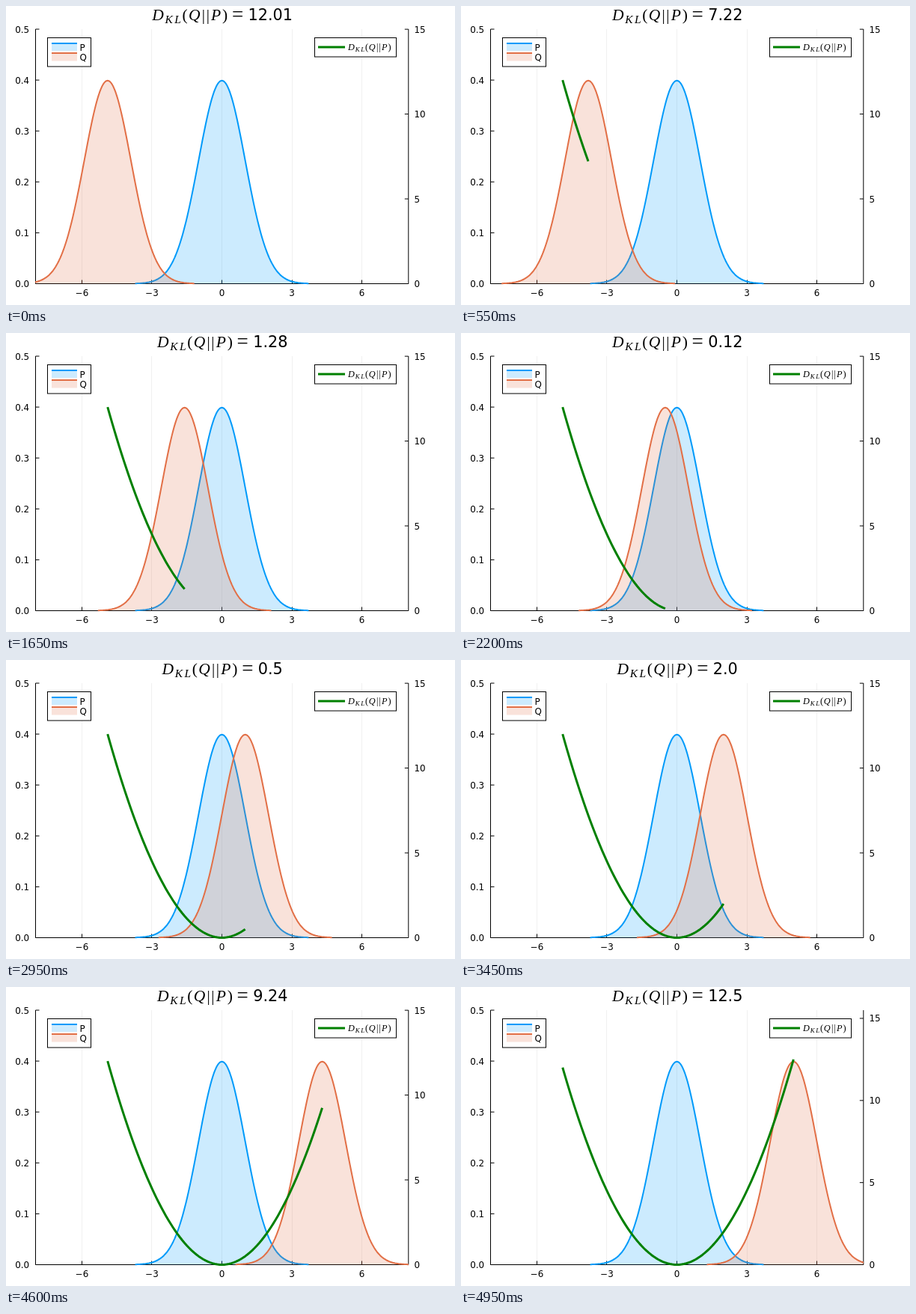
An HTML page for the animation above (5 s loop, 600 by 400 pixels).

```html
<!DOCTYPE html>
<html lang="en">
<head>
<meta charset="utf-8">
<title>KL divergence of two normals</title>
<style>
  html, body { margin: 0; width: 100%; height: 100%; overflow: hidden; background: #fff; }
  svg { display: block; width: 600px; height: 400px; }
  text { font: 11.9px "DejaVu Sans", sans-serif; }
  .math text { font: 21.5px "Liberation Serif", serif; }
  .math .it { font-style: italic; }
  .math .sub { font-size: 15.5px; font-style: italic; }
  .math .bar { font-size: 21px; }
  .math .eq { font-size: 27px; }
  #num { font-size: 20.8px; }
  .axis { stroke: #000; fill: none; }
  .grid { stroke: #000; stroke-opacity: .06; }
  .p { --c: #009afa; }
  .q { --c: #e26f46; }
  .line { fill: none; stroke: var(--c); stroke-width: 2; stroke-linejoin: round; }
  .fill { fill: var(--c); fill-opacity: .2; }
  .kl { fill: none; stroke: #008000; stroke-width: 3; stroke-linejoin: round; }
  .box { fill: #fff; stroke: #000; }
</style>
</head>
<body>
<svg viewBox="0 0 600 400">
  <defs>
    <clipPath id="plot"><rect x="39" y="30" width="499" height="343"/></clipPath>
    <g id="dkl" class="math">
      <text class="it" x="0.8">D</text>
      <text class="sub" x="18" y="4">K</text>
      <text class="sub" x="30.8" y="4">L</text>
      <text x="41">(</text>
      <text class="it" x="49.5">Q</text>
      <text class="bar" x="67.3">|</text>
      <text class="bar" x="73.1">|</text>
      <text class="it" x="79.5">P</text>
      <text x="94.5">)</text>
    </g>
  </defs>

  <g id="axes"></g>
  <g id="right"></g>

  <g clip-path="url(#plot)">
    <g class="p"><path class="fill"/><path class="line"/></g>
    <g class="q" id="q"><path class="fill"/><path class="line"/></g>
    <polyline class="kl" id="kl"/>
  </g>

  <rect class="box" x="55.5" y="42.5" width="58" height="38.5"/>
  <g class="p">
    <rect class="fill" x="61" y="50" width="34" height="10"/>
    <path class="line" d="M61 50H95"/>
    <text x="98.5" y="60">P</text>
  </g>
  <g class="q">
    <rect class="fill" x="61" y="63" width="34" height="10.5"/>
    <path class="line" d="M61 63H95"/>
    <text x="98.5" y="73">Q</text>
  </g>
  <rect class="box" x="412.5" y="42.5" width="109" height="25.5"/>
  <path class="kl" d="M417 55H453"/>
  <use href="#dkl" transform="translate(456.6 59) scale(.57)"/>

  <g id="title">
    <use href="#dkl"/>
    <g class="math"><text class="eq" x="107.4" y="1">=</text></g>
    <text id="num" x="129"></text>
  </g>
</svg>
<script>
const FRAME = 50, COUNT = 100, REACH = 3.719;
const LEFT = 39.2, RIGHT = 537.8, TOP = 31, BASE = 371.5;
const $ = id => document.getElementById(id);
const px = x => 288.5 + x * 31.17;
const py = (y, max) => BASE - y / max * (BASE - TOP);
const mean = k => (k - 49) / 10;
const kl = m => m * m / 2;

const stroke = (d, cls = "axis") => `<path class="${cls}" d="${d}"/>`;
const label = (x, y, s, anchor) => `<text x="${x}" y="${y}" text-anchor="${anchor}">${s}</text>`;

function drawAxes() {
  let out = "";
  for (let x = -6; x <= 6; x += 3) {
    const X = Math.floor(px(x)) + .5;
    out += stroke(`M${X} ${TOP}V${BASE}`, "grid") + stroke(`M${X} ${BASE}v-5`)
         + label(px(x), 387.8, String(x).replace("-", "\u2212"), "middle");
  }
  for (let i = 0; i <= 5; i++) {
    const y = py(i / 10, .5);
    out += stroke(`M39.5 ${y}h5`) + label(31.2, y + 4.5, (i / 10).toFixed(1), "end");
  }
  $("axes").innerHTML = out + stroke(`M39.5 ${TOP}V${BASE}H${RIGHT}V${TOP}`);
}

function drawRight(max) {
  let out = "";
  for (let v = 0; v <= 15; v += 5) {
    const y = py(v, max);
    out += stroke(`M${RIGHT} ${y}h-5`) + label(545.4, y + 4.5, v, "start");
  }
  $("right").innerHTML = out;
}

function drawBells() {
  const pts = [], n = 150;
  for (let i = 0; i <= n; i++) {
    const x = REACH * (2 * i / n - 1);
    const y = Math.exp(-x * x / 2) / Math.sqrt(2 * Math.PI);
    pts.push(px(x).toFixed(2) + " " + py(y, .5).toFixed(2));
  }
  const curve = "M" + pts.join("L");
  const area = `${curve}L${px(REACH)} ${BASE}H${px(-REACH)}Z`;
  document.querySelectorAll("path.fill").forEach(e => e.setAttribute("d", area));
  document.querySelectorAll(".fill + .line:not([d])").forEach(e => e.setAttribute("d", curve));
}

// Two decimals, ties to even, always at least one decimal shown.
function format(v) {
  const h = v * 100, f = Math.floor(h);
  const r = (h - f === .5 ? f + f % 2 : Math.round(h)) / 100;
  return Number.isInteger(r) ? r + ".0" : String(r);
}

function show(k) {
  const m = mean(k), max = Math.max(kl(mean(0)), kl(m)) + 3;
  drawRight(max);
  $("q").setAttribute("transform", `translate(${px(m) - px(0)})`);

  const pts = [];
  for (let i = 0; k && i <= k; i++) pts.push(px(mean(i)) + "," + py(kl(mean(i)), max));
  $("kl").setAttribute("points", pts.join(" "));

  const s = format(kl(m));
  const width = 129 + ((s.length - 1) * .636 + .318) * 20.8;
  $("num").textContent = s;
  $("title").setAttribute("transform", `translate(${288.8 - width / 2} 19)`);
}

let last = -1;
function tick() {
  const k = Math.floor(performance.now() / FRAME) % COUNT;
  if (k !== last) show(last = k);
  requestAnimationFrame(tick);
}

drawAxes();
drawBells();
tick();
</script>
</body>
</html>
```
